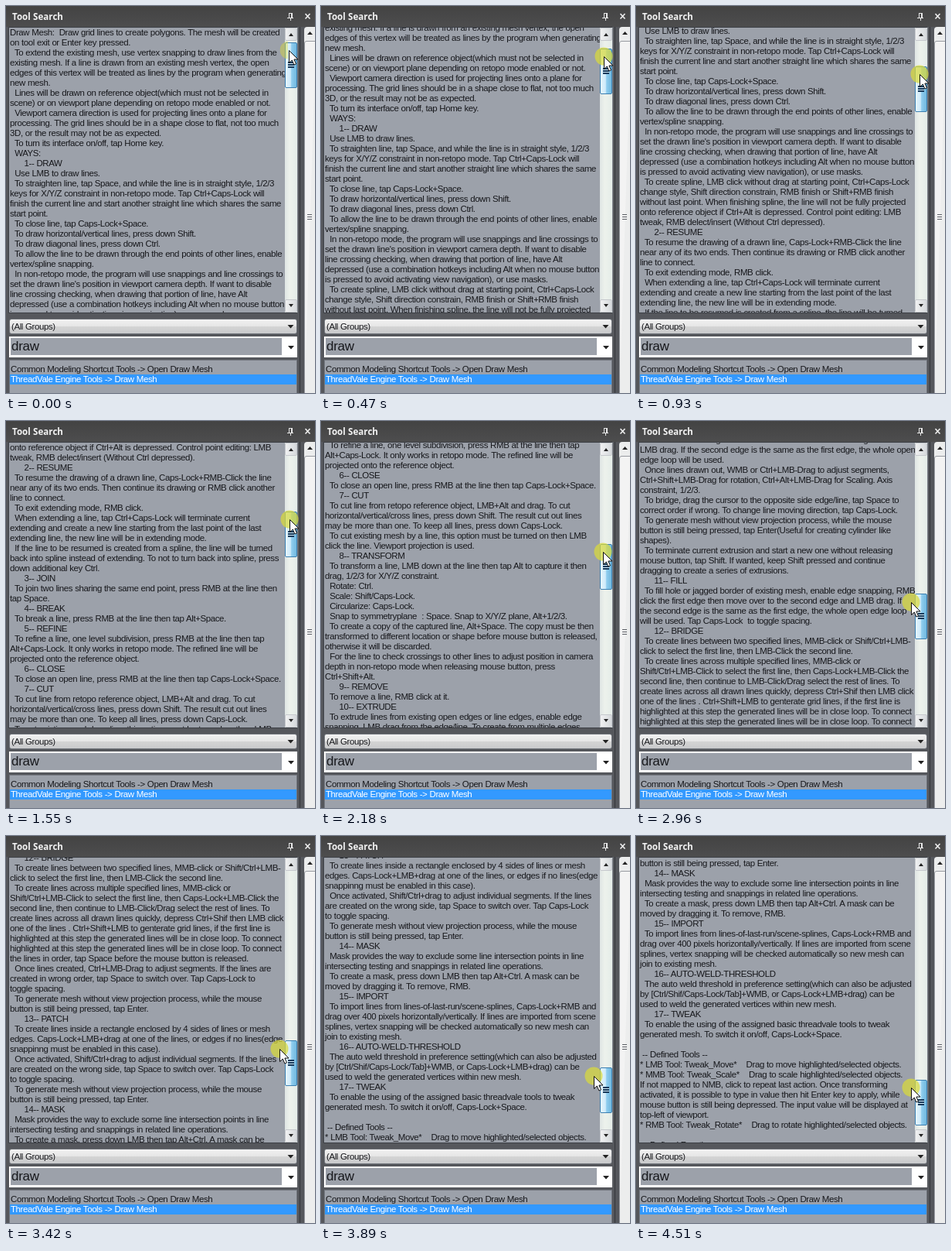
Animation, 400 px wide and 500 px high, one loop 4.67 s. Source, as an HTML page:

```html
<!DOCTYPE html>
<html lang="en">
<head>
<meta charset="utf-8">
<title>Tool Search</title>
<style>
  html, body { margin: 0; width: 100%; height: 100%; overflow: hidden; }
  body { position: relative; background: #55575c; color: #17181c;
    font: 11.5px/13px "Liberation Sans", Arial, sans-serif; letter-spacing: -.41px; word-spacing: .3px; }
  body > *, #bar > * { position: absolute; box-sizing: border-box; white-space: pre; margin: 0; }
  #title { left: 0; top: 0; width: 400px; height: 27px; background: linear-gradient(#434343, #4d4d4e);
    color: #f2f2f2; font: bold 11.6px/27px "Open Sans", sans-serif; letter-spacing: 0; padding-left: 8px; }
  #view { left: 3px; top: 27px; width: 375px; height: 370px; background: #9ca1aa;
    border: 1px solid #3d4046; border-right-color: #7d8189; overflow: hidden; }
  #clip { left: 4px; top: 28px; width: 357px; height: 368px; overflow: hidden; }
  #help { margin: 0; font: inherit; padding-left: 1px; will-change: transform; }
  #bar { left: 361px; top: 28px; width: 16px; height: 368px;
    background: linear-gradient(90deg, #dfe5e4, #edf2ec 40%, #e4ece8); }
  .button { left: 0; width: 16px; height: 17px; border: 1px solid #c6c9cd; border-radius: 2px;
    background: linear-gradient(90deg, #f0f1f2, #d6d9dc); }
  #thumb { left: 0; top: 19px; width: 16px; height: 59px; border: 1px solid #3c7fb1; border-radius: 2px;
    background: linear-gradient(90deg, #e6f5fc, #cdeafa 45%, #8fcdee 55%, #70b8df); }
  #thumb::after { content: ""; position: absolute; left: 3px; top: 24px; width: 8px; height: 8px;
    background: repeating-linear-gradient(#17395a 0 2px, #d5eefa 2px 3px); }
  #groups { left: 4px; top: 404px; width: 373px; height: 20px; border: 1px solid #6d7178; border-radius: 3px;
    background: linear-gradient(#f1f1f1, #e6e6e6 48%, #d4d4d4 52%, #c9cacc); padding: 3px 2px; }
  #query { left: 4px; top: 427px; width: 373px; height: 27px; background: #fff; }
  #query::before { content: "draw"; position: absolute; left: 2px; top: 2px; width: 351px; height: 22px;
    background: #9ca1aa; font-size: 17px; line-height: 21px; letter-spacing: -.3px; padding-left: 1px; box-sizing: border-box; }
  #list { left: 4px; top: 457px; width: 373px; height: 43px; background: #9ca1aa;
    border: 1px solid #70747c; border-bottom: 0; padding-top: 5px; }
  #list div { padding-left: 1px; height: 13px; }
  #list .chosen { background: #3399ff; color: #fff; }
  #side { left: 386px; top: 27px; width: 14px; height: 473px; background: #eceded; border-radius: 4px 0 0; }
  #art { left: 0; top: 0; width: 400px; height: 500px; }
</style>
</head>
<body>
<div id="title">Tool Search</div>
<div id="view"></div>
<div id="clip"><pre id="help">Draw Mesh:  Draw grid lines to create polygons. The mesh will be created
on tool exit or Enter key pressed.
  To extend the existing mesh, use vertex snapping to draw lines from the
existing mesh. If a line is drawn from an existing mesh vertex, the open
edges of this vertex will be treated as lines by the program when generating
new mesh.
  Lines will be drawn on reference object(which must not be selected in
scene) or on viewport plane depending on retopo mode enabled or not.
  Viewport camera direction is used for projecting lines onto a plane for
processing. The grid lines should be in a shape close to flat, not too much
3D, or the result may not be as expected.
  To turn its interface on/off, tap Home key.
  WAYS:
      1-- DRAW
  Use LMB to draw lines.
  To straighten line, tap Space, and while the line is in straight style, 1/2/3
keys for X/Y/Z constraint in non-retopo mode. Tap Ctrl+Caps-Lock will
finish the current line and start another straight line which shares the same
start point.
  To close line, tap Caps-Lock+Space.
  To draw horizontal/vertical lines, press down Shift.
  To draw diagonal lines, press down Ctrl.
  To allow the line to be drawn through the end points of other lines, enable
vertex/spline snapping.
  In non-retopo mode, the program will use snappings and line crossings to
set the drawn line's position in viewport camera depth. If want to disable
line crossing checking, when drawing that portion of line, have Alt
depressed (use a combination hotkeys including Alt when no mouse button
is pressed to avoid activating view navigation), or use masks.
  To create spline, LMB click without drag at starting point, Ctrl+Caps-Lock
change style, Shift direction constrain, RMB finish or Shift+RMB finish
without last point. When finishing spline, the line will not be fully projected
onto reference object if Ctrl+Alt is depressed. Control point editing: LMB
tweak, RMB delect/insert (Without Ctrl depressed).
      2-- RESUME
  To resume the drawing of a drawn line, Caps-Lock+RMB-Click the line
near any of its two ends. Then continue its drawing or RMB click another
line to connect.
  To exit extending mode, RMB click.
  When extending a line, tap Ctrl+Caps-Lock will terminate current
extending and create a new line starting from the last point of the last
extending line, the new line will be in extending mode.
  If the line to be resumed is created from a spline, the line will be turned
back into spline instead of extending. To not to turn back into spline, press
down additional key Ctrl.
      3-- JOIN
  To join two lines sharing the same end point, press RMB at the line then
tap Space.
      4-- BREAK
  To break a line, press RMB at the line then tap Alt+Space.
      5-- REFINE
  To refine a line, one level subdivision, press RMB at the line then tap
Alt+Caps-Lock. It only works in retopo mode. The refined line will be
projected onto the reference object.
      6-- CLOSE
  To close an open line, press RMB at the line then tap Caps-Lock+Space.
      7-- CUT
  To cut line from retopo reference object, LMB+Alt and drag. To cut
horizontal/vertical/cross lines, press down Shift. The result cut out lines
may be more than one. To keep all lines, press down Caps-Lock.
  To cut existing mesh by a line, this option must be turned on then LMB
click the line. Viewport projection is used.
      8-- TRANSFORM
  To transform a line, LMB down at the line then tap Alt to capture it then
drag, 1/2/3 for X/Y/Z constraint.
  Rotate: Ctrl.
  Scale: Shift/Caps-Lock.
  Circularize: Caps-Lock.
  Snap to symmetryplane  : Space. Snap to X/Y/Z plane, Alt+1/2/3.
  To create a copy of the captured line, Alt+Space. The copy must be then
transformed to different location or shape before mouse button is released,
otherwise it will be discarded.
  For the line to check crossings to other lines to adjust position in camera
depth in non-retopo mode when releasing mouse button, press
Ctrl+Shift+Alt.
      9-- REMOVE
  To remove a line, RMB click at it.
      10-- EXTRUDE
  To extrude lines from existing open edges or line edges, enable edge
snapping, LMB drag from the edge/line. To create from multiple edges,
LMB click the first edge line then move over to the second edge line and
LMB drag. If the second edge is the same as the first edge, the whole open
edge loop will be used.
  Once lines drawn out, WMB or Ctrl+LMB-Drag to adjust segments,
Ctrl+Shift+LMB-Drag for rotation, Ctrl+Alt+LMB-Drag for Scaling. Axis
constraint, 1/2/3.
  To bridge, drag the cursor to the opposite side edge/line, tap Space to
correct order if wrong. To change line moving direction, tap Caps-Lock.
  To generate mesh without view projection process, while the mouse
button is still being pressed, tap Enter(Useful for creating cylinder like
shapes).
  To terminate current extrusion and start a new one without releasing
mouse button, tap Shift. If wanted, keep Shift pressed and continue
dragging to create a series of extrusions.
      11-- FILL
  To fill hole or jagged border of existing mesh, enable edge snapping, RMB
click the first edge then move over to the second edge and LMB drag. If
the second edge is the same as the first edge, the whole open edge loop
will be used. Tap Caps-Lock  to toggle spacing.
      12-- BRIDGE
  To create lines between two specified lines, MMB-click or Shift/Ctrl+LMB-
click to select the first line, then LMB-Click the second line.
  To create lines across multiple specified lines, MMB-click or
Shift/Ctrl+LMB-Click to select the first line, then Caps-Lock+LMB-Click the
second line, then continue to LMB-Click/Drag select the rest of lines. To
create lines across all drawn lines quickly, depress Ctrl+Shif then LMB click
one of the lines . Ctrl+Shift+LMB to genterate grid lines, if the first line is
highlighted at this step the generated lines will be in close loop. To connect
highlighted at this step the generated lines will be in close loop. To connect
the lines in order, tap Space before the mouse button is released.
  Once lines created, Ctrl+LMB-Drag to adjust segments. If the lines are
created in wrong order, tap Space to switch over. Tap Caps-Lock to
toggle spacing.
  To generate mesh without view projection process, while the mouse
button is still being pressed, tap Enter.
      13-- PATCH
  To create lines inside a rectangle enclosed by 4 sides of lines or mesh
edges. Caps-Lock+LMB+drag at one of the lines, or edges if no lines(edge
snappinng must be enabled in this case).
  Once activated, Shift/Ctrl+drag to adjust individual segments. If the lines
are created on the wrong side, tap Space to switch over. Tap Caps-Lock
to toggle spacing.
  To generate mesh without view projection process, while the mouse
button is still being pressed, tap Enter.
      14-- MASK
  Mask provides the way to exclude some line intersection points in line
intersecting testing and snappings in related line operations.
  To create a mask, press down LMB then tap Alt+Ctrl. A mask can be
moved by dragging it. To remove, RMB.
      15-- IMPORT
  To import lines from lines-of-last-run/scene-splines, Caps-Lock+RMB and
drag over 400 pixels horizontally/vertically. If lines are imported from scene
splines, vertex snapping will be checked automatically so new mesh can
join to existing mesh.
      16-- AUTO-WELD-THRESHOLD
  The auto weld threshold in preference setting(which can also be adjusted
by [Ctrl/Shif/Caps-Lock/Tab]+WMB, or Caps-Lock+LMB+drag) can be
used to weld the generated vertices within new mesh.
      17-- TWEAK
  To enable the using of the assigned basic threadvale tools to tweak
generated mesh. To switch it on/off, Caps-Lock+Space.

 -- Defined Tools --
* LMB Tool: Tweak_Move*    Drag to move highlighted/selected objects.
* MMB Tool: Tweak_Scale*    Drag to scale highlighted/selected objects.
If not mapped to NMB, click to repeat last action. Once transforming
activated, it is possible to type in value then hit Enter key to apply, while
mouse button is still being depressed. The input value will be displayed at
top-left of viewport.
* RMB Tool: Tweak_Rotate*    Drag to rotate highlighted/selected objects.

 -- Defined Functions --</pre></div>
<div id="bar">
  <div class="button" style="top:0"></div>
  <div class="button" style="bottom:0"></div>
  <div id="thumb"></div>
</div>
<div id="groups">(All Groups)</div>
<div id="query"></div>
<div id="list"><div>Common Modeling Shortcut Tools -> Open Draw Mesh</div><div class="chosen">ThreadVale Engine Tools -> Draw Mesh</div></div>
<div id="side"></div>
<svg id="art" viewBox="0 0 400 500">
  <path d="M380.500 27V500" stroke="#33353a"/>
  <path d="M366 9.500h5M366.500 10v5M369.500 10v5M370.500 10v5M364 15.500h8M368.500 16v3" stroke="#e6e6e6"/>
  <path d="M387.500 10l6 6.500M393.500 10l-6 6.500" stroke="#eee" stroke-width="1.600"/>
  <path d="M366 39h6l-3-4zM366 385h6l-3 4zM364.500 412h8l-4 4.500zM365 439h8l-4 4.500zM390 37h7l-3.500-4z" fill="#222"/>
  <path d="M401 45.500H389q-2.500 0-2.500 2.500V501" fill="#f3f3f3" stroke="#979aa0"/>
  <path d="M390 269.500h6M390 272.500h6M390 275.500h6" stroke="#5c5f66"/>
  <g id="pointer">
    <circle id="halo" r="11.500" fill="#dada3a"/>
    <path d="M.5.5V16.500L4.300 13l2.600 6 2.600-1.100L6.900 12H12z" fill="#fff" stroke="#111"/>
  </g>
</svg>
<script>
const LOOP = 4670, HOLD = 470, STEP = (LOOP - HOLD) / 27;
// step, scroll offset, pointer x, pointer y
const keys = [
  [0, 0, 366, 57], [4, 184, 367, 88], [8, 416, 367, 127], [12, 666, 365, 169],
  [17, 1050, 356, 234], [23, 1504, 353, 310], [27, 1598, 356, 325]
];
const $ = id => document.getElementById(id);

function slope(i, c) {
  const a = keys[Math.max(i - 1, 0)], b = keys[Math.min(i + 1, keys.length - 1)];
  return (b[c] - a[c]) / (b[0] - a[0]);
}

// Cubic Hermite through the keys, rounded to whole pixels
function at(step, c) {
  let i = 0;
  while (i < keys.length - 2 && step >= keys[i + 1][0]) i++;
  const a = keys[i], b = keys[i + 1], span = b[0] - a[0], u = (step - a[0]) / span, v = 1 - u;
  return Math.round(a[c] * v * v * (1 + 2 * u) + b[c] * u * u * (3 - 2 * u)
    + span * u * v * (slope(i, c) * v - slope(i + 1, c) * u));
}

function draw(now) {
  const t = now % LOOP;
  const step = Math.min(27, Math.max(0, Math.floor((t - HOLD) / STEP + 1.07)));
  const scroll = at(step, 1);
  $('help').style.transform = `translateY(${-scroll}px)`;
  $('thumb').style.top = 19 + Math.round(scroll / 5.96) + 'px';
  $('pointer').setAttribute('transform', `translate(${at(step, 2)} ${at(step, 3)})`);
  $('halo').style.clipPath = step ? '' : 'inset(0 55% 0 0)';
  $('halo').setAttribute('opacity', step ? .72 : .45);
}

const start = performance.now();
function frame() {
  draw(performance.now() - start);
  requestAnimationFrame(frame);
}
frame();
</script>
</body>
</html>
```
